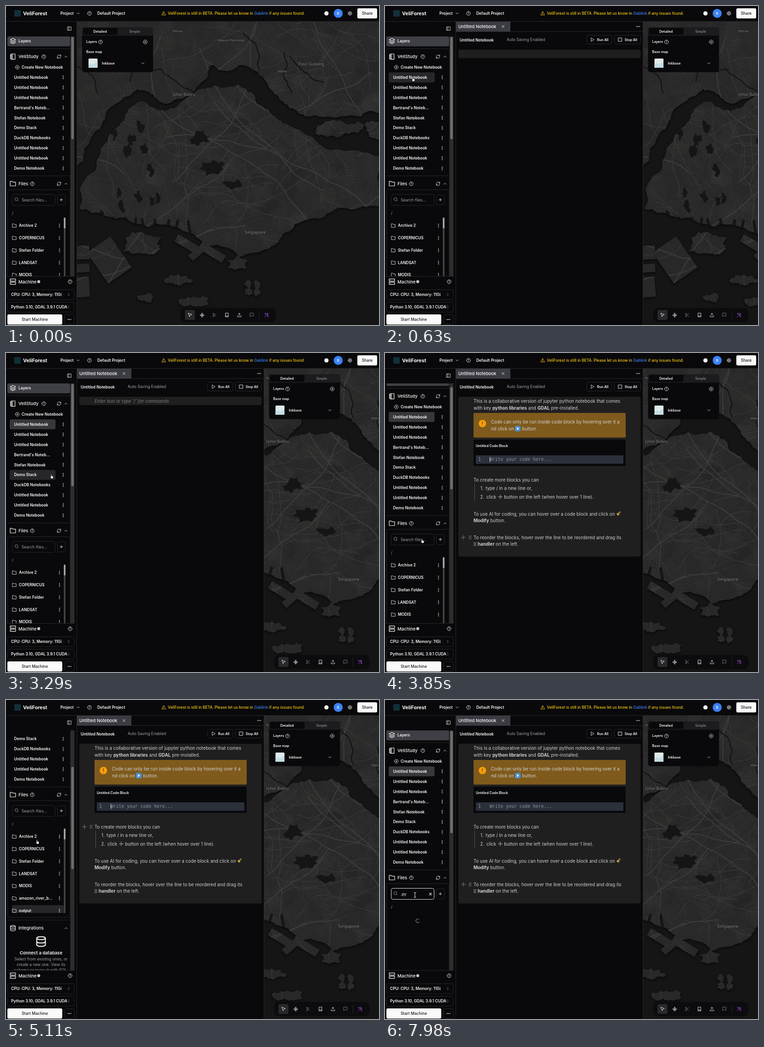
An HTML page with a canvas that plays this animation: 809x692 px, repeating every 8 s.

```html
<!DOCTYPE html>
<html lang="en">
<head>
<meta charset="utf-8">
<title>Notebook workspace</title>
<style>
html, body { margin: 0; width: 100%; height: 100%; overflow: hidden; background: #151515; }
#stage { position: absolute; inset: 0; overflow: hidden; }
#map, #ui { position: absolute; left: 0; top: 0; width: 809px; height: 692px; display: block; overflow: hidden; }
text { font-family: Inter, "Open Sans", sans-serif; white-space: pre; }
.mono { font-family: "DejaVu Sans Mono", monospace; }
.place { font-family: "Noto Sans", sans-serif; paint-order: stroke; stroke: #1b1b1b; stroke-width: 1.4px; }
</style>
</head>
<body>
<div id="stage">
<canvas id="map" width="809" height="692"></canvas>
<svg id="ui" viewBox="0 0 809 692"></svg>
</div>
<script>
const W = 809, H = 692;
const BG = '#09090b', LINE = '#27272a', FG = '#fafafa', MUTED = '#a1a1aa', BODY = '#d0d0d4', DARK = '#18181b';
const WATER = '#151515';

// ---------- map ----------
let seed = 7;
const rnd = () => {
  seed = (seed + 0x6D2B79F5) | 0;
  let v = Math.imul(seed ^ (seed >>> 15), 1 | seed);
  v = (v + Math.imul(v ^ (v >>> 7), 61 | v)) ^ v;
  return ((v ^ (v >>> 14)) >>> 0) / 4294967296;
};
const spread = (from, to) => from + rnd() * (to - from);

// Closed outline whose edges are broken by midpoint displacement
function outline(pts, rounds, k) {
  for (let n = 0; n < rounds; n++) {
    pts = pts.flatMap((a, i) => {
      const b = pts[(i + 1) % pts.length], o = spread(-k, k);
      return [a, [(a[0] + b[0]) / 2 - (b[1] - a[1]) * o, (a[1] + b[1]) / 2 + (b[0] - a[0]) * o]];
    });
  }
  const path = new Path2D();
  pts.forEach(p => path.lineTo(...p));
  path.closePath();
  return path;
}
const coast = s => outline(s.split(' ').map(p => p.split(',').map(Number)), 3, .16);

function blob(x, y, w, h, spiky = .3) {
  const pts = Array.from({ length: 12 }, (_, i) => {
    const r = spread(1 - spiky, 1 + spiky), a = i * Math.PI / 6;
    return [x + Math.cos(a) * w * r, y + Math.sin(a) * h * r];
  });
  return outline(pts, 2, .25);
}
function block(x, y, w, h, angle) {
  const path = new Path2D(), cos = Math.cos(angle), sin = Math.sin(angle);
  [[-1, -1], [1, -1], [1, 1], [-1, 1]].forEach(([u, v]) =>
    path.lineTo(x + u * w / 2 * cos - v * h / 2 * sin, y + u * w / 2 * sin + v * h / 2 * cos));
  path.closePath();
  return path;
}
// Wandering line of short steps
function walk(x, y, heading, steps, wobble) {
  const path = new Path2D();
  path.moveTo(x, y);
  for (let i = 0; i < steps; i++) {
    heading += spread(-wobble, wobble);
    path.lineTo(x += Math.cos(heading) * 7, y += Math.sin(heading) * 7);
  }
  return path;
}

function paintMap() {
  const canvas = document.createElement('canvas');
  canvas.width = W;
  canvas.height = H;
  const c = canvas.getContext('2d');
  const fill = (path, color) => { c.fillStyle = color; c.fill(path); };
  const stroke = (path, color, width) => { c.strokeStyle = color; c.lineWidth = width; c.stroke(path); };
  c.lineJoin = 'round';
  c.fillStyle = WATER;
  c.fillRect(0, 0, W, H);

  const land = new Path2D();
  land.addPath(coast('140,20 820,20 820,230 770,240 715,243 655,240 615,222 590,195 565,165 545,142 505,128 480,142 445,128 438,152 412,178 370,202 350,212 310,186 285,180 250,205 215,245 185,285 168,335 140,350'));
  land.addPath(coast('345,228 372,218 410,187 455,172 503,170 536,190 556,217 602,255 640,270 690,308 760,314 820,335 820,430 760,440 690,457 612,490 575,522 545,535 505,545 440,520 396,492 345,474 276,471 215,455 158,440 165,385 200,330 245,260 276,215 300,208'));
  // Islands
  [[298, 515, 42, 26], [500, 560, 20, 14], [725, 268, 50, 16], [805, 270, 24, 20], [374, 594, 32, 10], [408, 640, 30, 12], [303, 634, 20, 9]]
    .forEach(a => land.addPath(blob(...a)));
  for (let i = 0; i < 4; i++) land.addPath(blob(526 + i % 2 * 18, 604 + (i >> 1) * 16, 7, 8));
  // Reclaimed ground and piers
  land.addPath(block(224, 551, 62, 82, -.6));
  [0, 1].forEach(i => land.addPath(block(395 + i * 52, 518 + i * 16, 60, 18, .55)));
  land.addPath(block(412, 537, 16, 32, .85));
  [[535, 30], [569, 18], [610, 44]].forEach(([y, h]) => land.addPath(block(162, y, 38, h, -.07)));

  c.save();
  c.shadowColor = '#080808';
  c.shadowBlur = 4;
  c.shadowOffsetY = 2;
  fill(land, '#282828');
  c.restore();
  c.save();
  c.clip(land);
  for (let i = 0; i < 60; i++) fill(blob(spread(154, W), spread(33, 520), 20, 17), i % 2 ? '#252525' : '#2b2b2a');

  // Street grids
  for (let i = 0; i < 480; i++) {
    const half = spread(7, 18), gap = spread(4, 8), grid = new Path2D();
    for (let d = -half; d < half; d += gap) {
      grid.moveTo(d, -half); grid.lineTo(d, half);
      grid.moveTo(-half, d); grid.lineTo(half, d);
    }
    c.save();
    c.translate(spread(160, W), spread(40, 540));
    c.rotate(rnd() * 3);
    stroke(grid, 'rgba(255,255,255,.045)', .6);
    c.restore();
  }
  // Roads, from lanes to expressways
  const roads = (count, steps, wobble, color, width) => {
    for (let i = 0; i < count; i++) stroke(walk(spread(154, W), spread(33, 530), rnd() * 6.3, steps, wobble), color, width);
  };
  roads(200, 14, .5, '#343434', .8);
  roads(70, 28, .3, '#393939', 1.2);
  roads(16, 60, .16, '#3d3d3d', 2);
  c.setLineDash([3, 1.5]);
  [[341, 250, 1.2], [600, 270, 2], [430, 470, -1]].forEach(([x, y, a]) => stroke(walk(x, y, a, 34, .3), '#4c4c4c', 1));
  c.setLineDash([]);

  // Reservoirs, inlets and docks
  [[428, 288, 20, 15], [436, 352, 20, 12], [460, 348, 16, 13], [490, 388, 20, 9]].forEach(a => fill(blob(...a, .6), WATER));
  for (let i = 0; i < 12; i++) fill(blob(spread(200, 330), spread(225, 460), 7, 11, .6), WATER);
  for (let i = 0; i < 8; i++) stroke(walk(200 + i * 70, 190 - i % 3 * 25, -1.6 + spread(-1, 1), 14, .6), WATER, 2.5);
  for (let x = 168; x < 400; x += spread(16, 30)) fill(block(x, 462 + x / 20, 6, 34, spread(-.3, .3)), WATER);
  c.restore();
  return canvas;
}

// ---------- interface ----------
const rect = (x, y, w, h, fill = 'none', r = 0, stroke = 'none', id = '') =>
  `<rect ${id && `id="${id}"`} x="${x}" y="${y}" width="${w}" height="${h}" rx="${r}" fill="${fill}" stroke="${stroke}"/>`;
const frame = (x, y, w, h, id) => rect(x, y, w, h, 'none', 3, LINE, id);
const dot = (x, y, r, fill) => `<circle cx="${x}" cy="${y}" r="${r}" fill="${fill}"/>`;
const text = (x, y, str, size = 8.45, weight = 560, fill = FG, more = '') =>
  `<text x="${x}" y="${y + size * .36}" font-size="${size}" font-weight="${weight}" fill="${fill}" ${more}>${str}</text>`;
const mid = 'text-anchor="middle"';
const small = (x, y, str, weight = 560, fill = FG, more = '') => text(x, y, str, 7.3, weight, fill, more);
const soft = (x, y, str, more = '') => text(x, y, str, 8.54, 400, MUTED, more);
const path = (d, stroke, w = 1, fill = 'none') => `<path d="${d}" stroke="${stroke}" stroke-width="${w}" fill="${fill}"/>`;
const group = (id, inner, more = '') => `<g id="${id}" ${more}>${inner}</g>`;
const ring = (x, y, r) => `M${x - r} ${y}a${r} ${r} 0 1 0 ${2 * r} 0a${r} ${r} 0 1 0 ${-2 * r} 0`;

// Line icons on a 24 unit square
const ICONS = {
  help: ring(12, 12, 10) + 'M9 9a3 3 0 1 1 4.500 2.600Q12 12.500 12 14M12 17v.2',
  plusRing: ring(12, 12, 10) + 'M8 12h8M12 8v8',
  plus: 'M5 12h14M12 5v14',
  up: 'M6 15l6-6 6 6',
  down: 'M6 9l6 6 6-6',
  sort: 'M7 15l5 5 5-5M7 9l5-5 5 5',
  refresh: 'M3 12a9 9 0 0 1 15-6.700L21 8V3M21 8h-5M21 12a9 9 0 0 1-15 6.700L3 16v5M3 16h5',
  folder: 'M2 20V3h7l3 3h10v14z',
  layers: 'M12 2L2 7l10 5 10-5zM2 12l10 5 10-5M2 17l10 5 10-5',
  book: 'M5 2h15v20H5zM2 6h5M2 10h5M2 14h5M2 18h5M10 2v20',
  panel: 'M3 3h18v18H3zM9 3v18',
  search: ring(11, 11, 8) + 'M21 21l-4-4',
  db: 'M3 5a9 3 0 0 0 18 0a9 3 0 0 0-18 0v14a9 3 0 0 0 18 0V5M3 12a9 3 0 0 0 18 0',
  server: 'M2 2h20v8H2zM2 14h20v8H2zM6 6h.2M6 18h.2',
  warn: 'M12 3L2 21h20zM12 9v5M12 17v.2',
  gear: ring(12, 12, 3) + ring(12, 12, 8) + 'M12 1v3M12 20v3M1 12h3M20 12h3M4 4l2 2M18 18l2 2M20 4l-2 2M4 20l2-2',
  cross: 'M6 6l12 12M18 6L6 18',
  play: 'M6 3l14 9-14 9z',
  square: 'M4 4h16v16H4z',
  arrow: 'M4 3l7 18 3-8 8-3z',
  nodes: ring(12, 5, 3) + ring(5, 13, 3) + ring(19, 13, 3) + ring(12, 20, 3) + 'M12 8v9M8 13h8',
  cut: ring(6, 6, 3) + ring(6, 18, 3) + 'M20 4L8 16M14 14l6 6M8 8l4 4',
  tablet: 'M5 2h14v20H5zM5 17h14',
  upload: 'M21 15v6H3v-6M17 8l-5-5-5 5M12 3v12',
  chat: 'M21 3v14H7l-4 4V3z',
  spark: 'M3 21L14 10M16 3l2 4 3 2-3 1-2 4-2-4-3-1 3-2zM6 3v5M4 6h5M19 16v5M16 18h5'
};
const icon = (name, x, y, s = 10, color = FG, w = 2) =>
  `<path d="${ICONS[name]}" transform="translate(${x - s / 2} ${y - s / 2}) scale(${s / 24})" fill="none" stroke="${color}" stroke-width="${w}" stroke-linecap="round" stroke-linejoin="round"/>`;
const dots = (x, y, dx, dy, color = FG) => [-1, 0, 1].map(i => dot(x + i * dx, y + i * dy, .9, color)).join('');
const kebab = (x, y) => dots(x, y, 0, 3);
const grip = (x, y, color) => dots(x - 1.5, y, 0, 3, color) + dots(x + 1.5, y, 0, 3, color);

const BOOKS = ['Untitled Notebook', 'Untitled Notebook', 'Untitled Notebook', "Bertrand's Noteb...", 'Stefan Notebook', 'Demo Stack',
  'DuckDB Notebooks', 'Untitled Notebook', 'Untitled Notebook', 'Demo Notebook'];
const FILES = ['Archive 2', 'COPERNICUS', 'Stefan Folder', 'LANDSAT', 'MODIS', 'amazon_river_b...', 'output'];
const bookY = i => 154.7 + i * 21.94, fileY = i => 476.3 + i * 26.78;

function sidebar() {
  const section = (name, label, y, helpX) => icon(name, 15, y, 14) + text(27, y, label, 9.6, 500) + icon('up', 130, y) +
    (helpX ? icon('help', helpX, y) + icon('refresh', 115, y) : '');
  const books = rect(8, 144, 99.5, 21.5, '#37373c', 3, 'none', 'picked') + rect(8, 0, 99.5, 21.5, LINE, 3, 'none', 'bookHover') +
    BOOKS.map((b, i) => text(17.5, bookY(i), b) + kebab(124, bookY(i))).join('');
  const search = rect(13.5, 408.5, 93, 24, BG, 4, LINE, 'box') + icon('search', 23, 419.5, 10, MUTED) +
    soft(34, 420.8, 'Search files...', 'id="query"') + rect(33.4, 415, .9, 11, FG, 0, 'none', 'caret') +
    group('clear', icon('cross', 98.5, 421, 9, FG, 3)) + frame(111.5, 409.5, 17.5, 22) + icon('plus', 120, 420.4);
  const files = rect(13, 0, 112, 24, LINE, 3, 'none', 'fileHover') +
    FILES.map((f, i) => icon('folder', 18, fileY(i)) + text(28, fileY(i), f) + kebab(116, fileY(i))).join('') +
    rect(125.5, 459, 3.5, 183, '#454545') + rect(125.5, 459, 3.5, 23.5, '#a8a8a8', 1.5);
  const database = section('db', 'Integrations', 675) + icon('db', 76, 704, 25) + text(76, 728.5, 'Connect a database', 9.6, 600, FG, mid) +
    ['Select from existing ones, or', 'create a new one. View its', 'schema or query it with SQL.'].map((s, i) => soft(76, 742 + i * 12.2, s, mid)).join('');
  const scrolled = rect(3, 66, 136, 21.5, '#3f3f46', 3) + icon('layers', 15, 76, 14) + text(27, 76.3, 'Layers') +
    path('M3 92.500h136M3 368.500h136M3 657.500h136', LINE) +
    section('book', 'VeliStudy', 109.8, 82) + icon('plusRing', 24.5, 132.8) + text(34, 132.8, 'Create New Notebook') + books +
    section('folder', 'Files', 385.6, 57) + frame(3.5, 398.5, 135.5, 253) + search + soft(13, 449, '/') +
    group('files', files, 'clip-path="url(#listClip)"') + group('spinner', path('M3 -2.600A4 4 0 1 0 3 2.600', '#8a8a92', 1.2)) + database;
  const select = (y, s) => frame(3.5, y - 10.5, 144.5, 21.5) + text(11, y, s) + icon('sort', 136, y, 8, MUTED);
  return rect(0, 33, 153.5, 659, BG) + icon('panel', 137.5, 49) +
    '<g clip-path="url(#sideClip)">' + rect(139.5, 66, 9, 520, '#2d2d2d') + rect(141.5, 67, 5.5, 222, '#6d6d6d', 2.7, 'none', 'thumb') +
    group('side', scrolled) + '</g>' + path('M0 586.500h149M153.500 33v659', LINE) +
    icon('server', 15, 598, 14) + text(27, 598.3, 'Machine', 9.6, 500) + dot(71, 598, 3.2, '#c4c4c8') + icon('help', 139, 598) +
    select(626, 'CPU: CPU: 3, Memory: 11Gi') + select(653, 'Python 3.10, GDAL 3.9.1 CUDA') +
    rect(3, 669, 119, 22, FG, 3) + text(62.5, 679.8, 'Start Machine', 8.54, 500, DARK, mid) + frame(127.5, 669.5, 20.5, 21) + dots(137.5, 680, 3, 0);
}

function header() {
  return rect(0, 0, W, 33, BG) + path('M0 33.500h809', LINE) + rect(18, 9, 14, 14, '#12303a', 1) +
    text(37, 16, 'VeliForest', 10.7, 700) + text(118, 16, 'Project') + icon('down', 156.5, 16) +
    icon('help', 181, 16) + text(198, 16.3, 'Default Project') + icon('warn', 341.8, 15.8, 10, '#facc15') +
    text(351, 16, 'VeliForest is still in BETA. Please let us know in <tspan fill="#3b82f6">Gablink</tspan> if any issues found.', 8.36, 500, '#facc15') +
    dot(695, 16, 4.6, FG) + dot(720.5, 16, 9.8, '#3b82f6') + text(720.5, 16, 'B', 8, 500, FG, mid) +
    icon('gear', 746, 16) + rect(762, 5, 43, 22, FG, 3) + text(783.5, 16, 'Share', 8.54, 500, DARK, mid);
}

function mapPanel() {
  return rect(165, 46, 154, 97.5, BG, 5) + rect(165, 46, 154, 18.5, '#1c1c1f', 4) + rect(167, 47.5, 75, 15, BG, 3) +
    small(204, 55, 'Detailed', 600, FG, mid) + small(279, 55, 'Simple', 500, '#8d8d94', mid) +
    small(174, 77.8, 'Layers', 600) + icon('help', 205, 78) + icon('plusRing', 302, 78) +
    small(174, 99.8, 'Base map', 600) + rect(179, 114, 19.5, 20, '#dfe9e9', 1.5) +
    path('M179 128l6-4 4 3 9.500-7v14h-19.500z', 'none', 0, '#c3dde2') + small(208, 124.2, 'Inkbase') + icon('down', 297, 124.3);
}

function toolbar() {
  const tools = ['arrow', 'nodes', 'cut', 'tablet', 'upload', 'chat'], dim = ['cut', 'chat'];
  return rect(378.5, 655, 207, 31, '#0c0c0e', 11) + rect(388, 659.5, 21.5, 21.5, '#29292c', 3) +
    tools.map((n, i) => icon(n, 398.5 + i * 26.9, 670.3, 10, dim.includes(n) ? '#85858c' : FG)).join('') +
    path('M549 661v19', LINE) + icon('spark', 565, 670.3, 11, '#a855f7');
}

function notebook() {
  const line = (x, y, s) => text(x, y, s, 9.76, 400, BODY);
  const code = (x, s) => text(x, 230.8, s, 9.76, 400, '#8b919c', 'class="mono"');
  const b = s => `<tspan font-weight="700">${s}</tspan>`;
  const star = (x, y, r) => path(`M${x} ${y - r}Q${x} ${y} ${x + r} ${y}Q${x} ${y} ${x} ${y + r}Q${x} ${y} ${x - r} ${y}Q${x} ${y} ${x} ${y - r}`, '#f5c542', .7, '#f5c542');
  const cell = (h, id) => rect(159, 95, 395.5, h, '#1f1f20', 4, 'none', id);
  const callout = rect(192, 130, 330, 53.5, '#7f5a1c', 2) + dot(211.3, 153, 8, '#f59e0b') + path('M211.300 148.500v5.500M211.300 156v1.500', '#5c3c08', 1.4) +
    line(229.7, 149.8, 'Code can only be run inside code block by hovering over it a') + line(229.7, 164.3, 'nd click on') +
    rect(282, 158, 12, 12, '#4b8fd0', 2) + path('M286 160.800l5 3.200-5 3.200z', 'none', 0, FG) + line(297.3, 164.3, 'button.');
  const codeBlock = rect(192, 188, 330, 57, BG, 2) + small(197, 201, 'Untitled Code Block') + rect(197, 222, 320, 18.3, '#2b303b') +
    code(202, '1') + code(227, 'Write your code here...') + rect(227, 225.5, .9, 11, FG, 0, 'none', 'codeCaret');
  const steps = line(192, 275, 'To create more blocks you can') + path('M194.500 284v37', '#55555b') +
    line(207, 293.6, '1.') + line(218, 293.6, 'type / in a new line or,') + line(206.5, 312, '2.') + line(220, 312, 'click') +
    path('M245.500 312h9M250 307.500v9', '#77777d', 2) + line(258.3, 312, 'button on the left (when hover over 1 line).');
  const content = cell(346.5) + line(192, 104.3, 'This is a collaborative version of jupyter python notebook that comes') +
    line(192, 119, `with key ${b('python libraries')} and ${b('GDAL')} pre-installed.`) + callout + codeBlock + steps +
    line(192, 349, 'To use AI for coding, you can hover over a code block and click on') +
    star(505.5, 349.5, 3.6) + star(509, 345.5, 1.6) + line(192, 363.5, `${b('Modify')} button.`) +
    line(192, 400, 'To reorder the blocks, hover over the line to be reordered and drag its') +
    grip(195, 414.6, BODY) + line(201, 414.6, `${b('handler')} on the left.`) +
    group('handle', icon('plus', 170, 0, 15, '#85858b', 1.5) + grip(184.5, 0, '#85858b'));
  return rect(154, 34, 406, 658, BG) + path('M154 55.500h406M559.500 34v658', LINE) + rect(154, 34, 118, 21.5, '#3b3b42') +
    text(159, 44.6, 'Untitled Notebook', 9.5, 500) + icon('cross', 256, 44.5) + dots(549, 44.5, 3, 0) +
    text(162, 73.6, 'Untitled Notebook') + soft(264, 73, 'Auto Saving Enabled') +
    frame(437.5, 63.5, 54.5, 19) + icon('play', 450, 73) + small(460, 73, 'Run All') +
    frame(497.5, 63.5, 57, 19) + icon('square', 510, 73, 11) + small(519.7, 73, 'Stop All') +
    group('empty', cell(18) + text(192, 104.3, "Enter text or type '/' for commands", 9.76, 400, '#7d7d83', 'id="hint" font-style="italic"')) +
    group('content', content);
}

const place = (x, y, name, size) => text(x, y, name, size, 400, '#8b8b8b', `${mid} class="place"`);
const places = place(372, 54.5, 'Tebrau', 7.3) + place(488, 74.5, 'Mukim Plentong', 7.3) + place(599.5, 141.5, 'Masai', 7.3) +
  place(662, 126, 'Pasir Gudang', 8.7) + place(386, 192, 'Johor Bahru', 8.7) + place(540.5, 491, 'Singapore', 9.6);

document.getElementById('ui').innerHTML =
  '<defs><clipPath id="sideClip"><rect y="66" width="149" height="520"/></clipPath>' +
  '<clipPath id="listClip"><rect x="4" y="459" width="134" height="183"/></clipPath></defs>' +
  group('places', places) + group('mapPanel', mapPanel()) + group('tools', toolbar()) + group('book', notebook()) + sidebar() + header() +
  group('hand', path('M-1.700-4.600q1-.9 1.700.3v2.900l2.900.7q1 .4.800 1.700l-.8 3.500h-3.600l-2.700-3.500q.2-1.200 1.700.1z', '#111', .7, FG)) +
  group('beam', path('M-2.500-5.500Q0-5.500 0-4V4Q0 5.500-2.500 5.500M2.500-5.500Q0-5.500 0-4M0 4Q0 5.500 2.500 5.500', FG));

// ---------- motion ----------
// Each move: start, end, then the values reached
const POINTER = [[70, 350, 61, 159], [1540, 1610, 60, 160], [2870, 3290, 99, 268], [3430, 3710, 81, 408],
  [4060, 4340, 68, 308], [5460, 6090, 55, 411], [6790, 7560, 65, 423]];
const SCROLL = [[3780, 3920, 32], [4060, 4830, 335], [4920, 5320, 0]];
const QUERY = '.py', KEY_START = 6790, KEY_GAP = 175;

const ease = f => f * f * (3 - 2 * f);
const glide = (moves, from, t) => moves.reduce((pos, [start, end, ...to]) => {
  const f = ease(Math.min(1, Math.max(0, (t - start) / (end - start))));
  return pos.map((v, i) => v + (to[i] - v) * f);
}, from);

const el = {};
document.querySelectorAll('#ui [id]').forEach(e => el[e.id] = e);
const show = (id, on) => { el[id].style.display = on ? '' : 'none'; };
const set = (id, key, value) => el[id].setAttribute(key, value);
const move = (id, x, y) => set(id, 'transform', `translate(${x} ${y})`);

const atlas = paintMap(), view = document.getElementById('map').getContext('2d');
let shown = null;
function shiftMap(x) {
  if (x === shown) return;
  shown = x;
  view.fillStyle = WATER;
  view.fillRect(0, 0, W, H);
  view.drawImage(atlas, x, 0);
  move('places', x, 0);
}

// Highlights the row of a list that lies under the pointer
function hover(id, count, rowY, half, y) {
  const i = [...Array(count).keys()].find(n => Math.abs(y - rowY(n)) < half);
  show(id, i !== undefined);
  if (i !== undefined) set(id, 'y', rowY(i) - half);
}

function render(time) {
  const t = Math.floor(time / 70) * 70;
  const [x, y] = glide(POINTER, [104, 262], t), [scroll] = glide(SCROLL, [0], t);
  const opened = t >= 490, centred = t >= 700, loaded = t >= 3430, focused = t >= 6020, beam = t >= 5950;

  shiftMap(centred ? 203 : opened ? 405 : 0);
  move('mapPanel', opened ? 405.5 : 0, 0);
  move('tools', opened ? 203 : 0, 0);
  show('book', opened);
  show('hint', t >= 910);
  show('empty', !loaded);
  show('content', loaded);
  show('codeCaret', !focused);
  move('handle', 0, y < 335 ? 275 : y < 385 ? 349 : 400);

  move('side', 0, -scroll);
  set('thumb', 'y', 67 + scroll * .433);
  show('picked', opened);
  // The hovered row lags while the list scrolls back
  const lag = t >= 4830 && t < 5320 ? 335 : scroll;
  const hy = t < 70 ? -1 : y + lag;
  hover('bookHover', BOOKS.length, bookY, 10.7, hy);
  hover('fileHover', FILES.length, fileY, 12, hy);

  const typed = QUERY.slice(0, Math.max(0, Math.floor((t - KEY_START) / KEY_GAP) + 1));
  set('box', 'stroke', focused ? '#e4e4e7' : LINE);
  el.query.textContent = typed || 'Search files...';
  set('query', 'fill', typed ? FG : MUTED);
  set('caret', 'x', typed ? 34.4 + el.query.getComputedTextLength() : 33.4);
  show('caret', (focused && t < 6650) || (typed && t < 7700));
  show('clear', typed);
  show('files', t < 6860);
  show('spinner', t >= 6860);
  set('spinner', 'transform', `translate(71 479) rotate(${(t - 7980) * .36})`);

  show('hand', t >= 70 && !beam);
  show('beam', beam);
  move(beam ? 'beam' : 'hand', x, y);
}

const start = performance.now();
(function loop() {
  render((performance.now() - start) % 8000);
  requestAnimationFrame(loop);
})();
</script>
</body>
</html>
```
